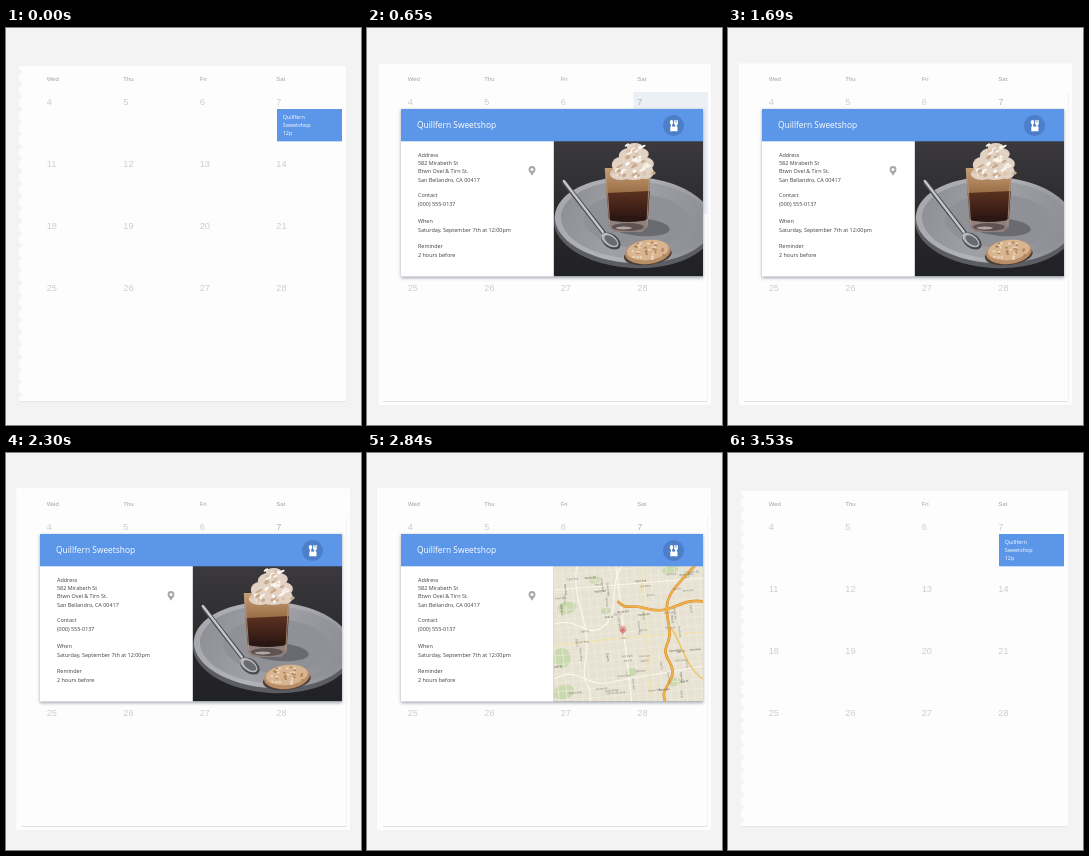
An HTML page with a canvas for the animation above (4000 ms loop, 355 px wide and 397 px high).

```html
<!DOCTYPE html>
<html lang="en">
<head>
<meta charset="utf-8">
<title>Calendar event</title>
<style>
html, body { margin: 0; width: 100%; height: 100%; overflow: hidden; background: #f3f3f3; }
canvas { display: block; width: 355px; height: 397px; }
</style>
</head>
<body>
<canvas id="stage"></canvas>
<script>
const LOOP = 4000, W = 355, H = 397;
const RIGHT = 336, TOP = 81, HEADER = 32;
const BLUE = '#5b96e9';
const SANS = '"Open Sans", sans-serif', GRID = '"Liberation Sans", Arial, sans-serif';
const canvas = document.getElementById('stage');
const ratio = window.devicePixelRatio || 1;
canvas.width = W * ratio;
canvas.height = H * ratio;
const c = canvas.getContext('2d');

const clamp = v => Math.max(0, Math.min(1, v));
const span = (t, a, b) => clamp((t - a) / (b - a));
const mix = (a, b, k) => a + (b - a) * k;
const easeOut = k => 1 - (1 - k) ** 3;
const easeInOut = k => k < .5 ? 2 * k * k : 1 - 2 * (1 - k) ** 2;

function box(x, y, w, h, color) {
  c.fillStyle = color;
  c.fillRect(x, y, w, h);
}

function oval(x, y, rx, ry, color, turn = 0) {
  c.fillStyle = color;
  c.beginPath();
  c.ellipse(x, y, rx, ry, turn, 0, Math.PI * 2);
  c.fill();
}

function shape(points, color) {
  c.fillStyle = color;
  c.beginPath();
  points.forEach(([x, y]) => c.lineTo(x, y));
  c.closePath();
  c.fill();
}

function line(path, color, width) {
  c.strokeStyle = color;
  c.lineWidth = width;
  c.stroke(new Path2D(path));
}

function gradient(x1, y1, x2, y2, ...colors) {
  const g = c.createLinearGradient(x1, y1, x2, y2);
  colors.forEach((color, i) => g.addColorStop(i / (colors.length - 1), color));
  return g;
}

function text(str, x, y, size, color, family = SANS) {
  c.font = `${size}px ${family}`;
  c.fillStyle = color;
  c.fillText(str, x, y);
}

function clipped(x, y, w, h, draw) {
  c.save();
  c.beginPath();
  c.rect(x, y, w, h);
  c.clip();
  draw();
  c.restore();
}

function faded(alpha, draw) {
  if (alpha <= 0) return;
  c.save();
  c.globalAlpha *= alpha;
  draw();
  c.restore();
}

function seeded(seed) {
  return () => (seed = (seed * 16807) % 2147483647) / 2147483647;
}

function drawPage(t, open) {
  box(0, 0, W, H, '#f3f3f3');
  if (open > 0) {
    const k = span(t, 470, 2600);
    const left = mix(12, 10, k), top = mix(36, 35, k);
    box(left, top, 344 - left, 377 - top, '#fdfdfd');
    box(16, 373, 324, 1, '#e3e3e3');
    box(340, 64, 1, 310, '#f3f3f3');
  } else {
    box(14, 373, 326, 1.2, '#e6e6e6');
    box(13, 38, 327, 335, '#fdfdfd');
    for (let y = 44; y < 372; y += 12.4)
      shape([[12, y - 4], [17, y], [12, y + 4]], '#f3f3f3');
  }
  const highlight = span(t, 480, 630) * (1 - span(t, 930, 1400));
  faded(highlight, () => box(266.5, 64, 74.5, 122, '#ebf0f7'));

  ['Wed', 'Thu', 'Fri', 'Sat'].forEach((day, col) => {
    const x = [40.7, 117.3, 193.7, 270.3][col];
    text(day, x, 51.2, 6, '#a2a2a2', GRID);
    for (let row = 0; row < 4; row++) {
      const date = 4 + col + row * 7;
      const color = date === 7 && open > 0 ? '#b4b4b4' : '#cdcdcd';
      text(date, x, 74.3 + row * 62, 9.2, color, GRID);
    }
  });
}

function drawPhoto(x, y) {
  c.save();
  c.translate(x, y);
  box(-10, -10, 190, 190, gradient(0, 0, 0, 136, '#3b393d', '#2c2b2e', '#202125'));

  // plate: rim, dish and well
  oval(80, 83, 80, 44, '#5c5d62', .05);
  oval(80, 79, 79, 43, gradient(0, 40, 150, 100, '#a6a7ac', '#b3b4b8', '#8f9095'), .05);
  oval(81, 79, 74, 39, gradient(0, 40, 150, 100, '#8b8c92', '#a0a1a6', '#8d8e94'), .05);
  oval(84, 80, 54, 27, '#909196', .05);
  oval(86, 86, 30, 9, '#6a6b71', .08);

  // glass with layered drink
  shape([[51, 27], [97, 27], [94, 86], [88, 91], [60, 91], [55, 86]], '#8e817d');
  shape([[51, 27], [97, 27], [95, 54], [53, 56]], gradient(0, 27, 0, 56, '#c59e76', '#93663e'));
  shape([[53, 52], [96, 50], [94, 78], [55, 78]], gradient(0, 50, 0, 78, '#5b3220', '#2d1612'));
  oval(74, 78, 19, 3, '#2a1613');
  oval(74, 86, 16, 4, '#5e5352');
  oval(70, 87, 8, 1.5, '#b0a7a5');
  line('M52 29 L56 84 M96 29 L93 84', '#b59a85', .8);

  // whipped cream
  [[67, 33, 11, 6], [80, 33, 14, 6], [92, 31, 8, 7], [67, 24, 9, 8],
   [86, 23, 14, 8], [76, 15, 11, 8], [86, 13, 9, 6], [81, 6, 8, 4]]
    .forEach(([px, py, rx, ry]) => oval(px, py, rx, ry, '#e2d2c4'));
  const rnd = seeded(31);
  const swirls = ['#f7f1ea', '#c9a98c', '#fbf7f1', '#d9c2ae'];
  for (let i = 0; i < 44; i++) {
    const py = 4 + rnd() * 32;
    const px = 80 + (rnd() - .5) * (12 + py);
    oval(px, py, 1.5 + rnd() * 2.5, 1 + rnd(), swirls[i % 4], -.5);
  }

  // spoon
  c.lineCap = 'round';
  line('M11 42 L50 92', '#4b4c51', 4.5);
  line('M10 40 L49 91', '#c6c7ca', 2.4);
  oval(57, 100, 11, 7, '#48494e', .62);
  oval(56, 99, 10, 5.5, '#b6b8bc', .62);
  oval(57, 99.5, 7.5, 3.8, '#6a6b71', .62);

  // cookie
  oval(94, 114, 24, 10, '#4a3d37', -.12);
  oval(94, 111, 23, 12, '#b98d66', -.12);
  oval(94, 109, 21, 10, '#d8b591', -.12);
  for (let i = 0; i < 34; i++) {
    const turn = rnd() * Math.PI * 2, reach = Math.sqrt(rnd());
    oval(94 + Math.cos(turn) * reach * 19, 110 + Math.sin(turn) * reach * 9,
      1.4, 1, i % 2 ? '#b48258' : '#edd7bd');
  }
  c.restore();
}

function drawMap(x, y, pin) {
  c.save();
  c.translate(x, y);
  box(-10, -10, 190, 190, '#e7e2d2');
  [[13, 42, 10, 6], [41, 14, 6, 3], [8, 92, 9, 10], [10, 126, 11, 7],
   [116, 4, 8, 4], [132, 9, 5, 4], [78, 106, 6, 4], [120, 116, 7, 4], [52, 45, 5, 3]]
    .forEach(([px, py, rx, ry]) => oval(px, py, rx, ry, '#cad9ae', -.2));

  for (let i = -3; i < 24; i++) {
    line(`M${i * 8 - 8} 0 l14 138`, '#f0ede2', .7);
    line(`M0 ${i * 9} l150 -13`, '#f0ede2', .6);
  }
  ['M0 58 C25 50 31 73 49 61 S54 20 68 0', 'M0 113 C28 98 30 125 63 115 L149 100',
   'M23 0 C17 34 38 57 32 91 S39 114 36 136', 'M62 0 L78 136', 'M0 24 L149 12']
    .forEach(road => line(road, '#faf7ec', 1.2));
  line('M0 80 L65 72 L149 66 M87 0 L98 136', '#f3e4a8', 1.1);

  const highway = 'M142 -2 C130 14 112 25 113 44 S119 65 113 79 S124 98 117 113 S108 124 112 138 ' +
    'M64 35 C70 44 77 39 86 41 S103 46 114 43 S135 32 151 36';
  line(highway, '#cf8a31', 2.7);
  line(highway, '#f1b04b', 1.9);
  line('M114 58 C128 73 130 100 149 113', '#eec25d', 1.4);

  const rnd = seeded(97);
  const labels = ['Oak St', 'Hill Park', 'Fern Ave', 'Elm St', 'North Rd', 'Green Way'];
  for (let i = 0; i < 64; i++) {
    c.save();
    c.translate(rnd() * 140, 4 + rnd() * 128);
    c.rotate(rnd() < .5 ? -.09 : 1.46);
    text(labels[i % labels.length], 0, 0, 2.7, i % 4 ? '#77736b' : '#45433f');
    c.restore();
  }
  faded(pin, () => {
    oval(70, 72, 3, 1, '#8f8b80');
    const py = mix(56, 67, easeOut(pin));
    shape([[66, py], [72, py], [69, py + 6]], '#c9252c');
    oval(69, py - .6, 3.5, 3.5, '#df343a');
    oval(69, py - .6, 1.2, 1.2, '#761519');
  });
  c.restore();
}

function drawMedia(t, open, left, bottom) {
  const width = (RIGHT - left) * .494;
  const x = RIGHT - width, y = TOP + HEADER;
  const rest = 1 - open;
  clipped(x, y, width, bottom - y, () => {
    drawPhoto(x - 18 * rest, y - 33 * rest);
    const wipe = easeInOut(span(t, 2535, 2790));
    if (!wipe) return;
    const reach = 214 * wipe;
    c.beginPath();
    c.moveTo(x - 90, y - 5);
    c.lineTo(x + reach + 2.4, y - 5);
    c.lineTo(x + reach - 68, y + 141);
    c.lineTo(x - 90, y + 141);
    c.clip();
    drawMap(x, y, span(t, 2800, 2920));
  });
}

function drawPlacePin(t, x, y, scale) {
  c.save();
  c.translate(x, y);
  c.scale(scale, scale);
  const ripple = easeOut(span(t, 2420, 2560));
  faded(ripple * (1 - span(t, 2700, 2790)), () => oval(0, 0, 6.8 * ripple, 6.8 * ripple, '#c6cce5'));
  const color = ripple && t < 2760 ? '#858da6' : '#a8a8a8';
  shape([[-3.1, 0], [3.1, 0], [0, 5]], color);
  oval(0, -1.3, 3.4, 3.4, color);
  oval(0, -1.3, 1.5, 1.5, '#fff');
  c.restore();
}

function drawDiningIcon(x, y) {
  oval(x, y, 10.5, 10.5, '#4d7ec8');
  oval(x - 2, y - 3.3, 1.7, 2.3, '#fff');
  box(x - 2.6, y - 2, 1.3, 7.6, '#fff');
  box(x + .7, y - 5.5, 3.6, 4.5, '#fff');
  box(x + 1.7, y - 2, 1.6, 7.6, '#fff');
  box(x - 3.2, y + 1, 7.2, 4.6, '#fff');
  box(x + 1.7, y - 5.5, .4, 2.4, '#4d7ec8');
  box(x + 2.9, y - 5.5, .4, 2.4, '#4d7ec8');
}

const DETAILS = [
  ['Address', 127.3], ['582 Mirabeth St', 135.5], ['Btwn Ovel & Tirn St.', 143.9],
  ['San Bellandro, CA 00417', 152.2], ['Contact', 168], ['(000) 555-0137', 176.2],
  ['When', 194], ['Saturday, September 7th at 12:00pm', 202.3],
  ['Reminder', 219], ['2 hours before', 227.3]
];

function drawCard(t, open) {
  const rest = 1 - open;
  const left = mix(271, 34, open), bottom = mix(113.3, 248.5, open);
  const width = RIGHT - left;

  c.save();
  if (open > 0) {
    c.shadowColor = 'rgba(70, 80, 105, .5)';
    c.shadowBlur = 3 * ratio;
    c.shadowOffsetY = ratio;
  }
  box(left, TOP, width, bottom - TOP, open > 0 ? '#fff' : BLUE);
  c.restore();

  clipped(left, TOP, width, bottom - TOP, () => {
    if (open > 0) {
      drawMedia(t, open, left, bottom);
      clipped(left, TOP + HEADER, width * .506, bottom - TOP - HEADER, () => {
        faded(span(open, .3, .8), () => DETAILS.forEach(([label, y], i) => {
          faded(i < 8 ? 1 : span(open, .88, .97), () =>
            text(label, left + 17 - 11 * rest, y - 10 * rest, 5.45, '#3f3f43'));
        }));
        const pin = span(open, .78, 1);
        if (pin) drawPlacePin(t, left + 131 - 40 * rest, 142.8 - 27 * rest, pin);
      });
    }
    box(left, TOP, width, HEADER + .3, BLUE);
    faded(1 - span(open, 0, .35), () => {
      ['Quillfern', 'Sweetshop', '12p'].forEach((label, i) =>
        text(label, left + 5.7, 89.3 + i * 8, 5.45, '#fff'));
    });
    faded(span(open, .3, .75), () =>
      text('Quillfern Sweetshop', left + 16 - 11 * rest, 97.5, 8.4, '#fff'));
    faded(span(open, .5, 1), () => drawDiningIcon(306.5 + 10 * rest, 97.6));
  });
}

function render(t) {
  c.setTransform(ratio, 0, 0, ratio, 0, 0);
  c.textBaseline = 'middle';
  const open = easeOut(span(t, 350, 612)) * (1 - easeInOut(span(t, 3385, 3525)));
  drawPage(t, open);
  drawCard(t, open);
}

function tick() {
  render(performance.now() % LOOP);
  requestAnimationFrame(tick);
}
tick();
</script>
</body>
</html>
```
